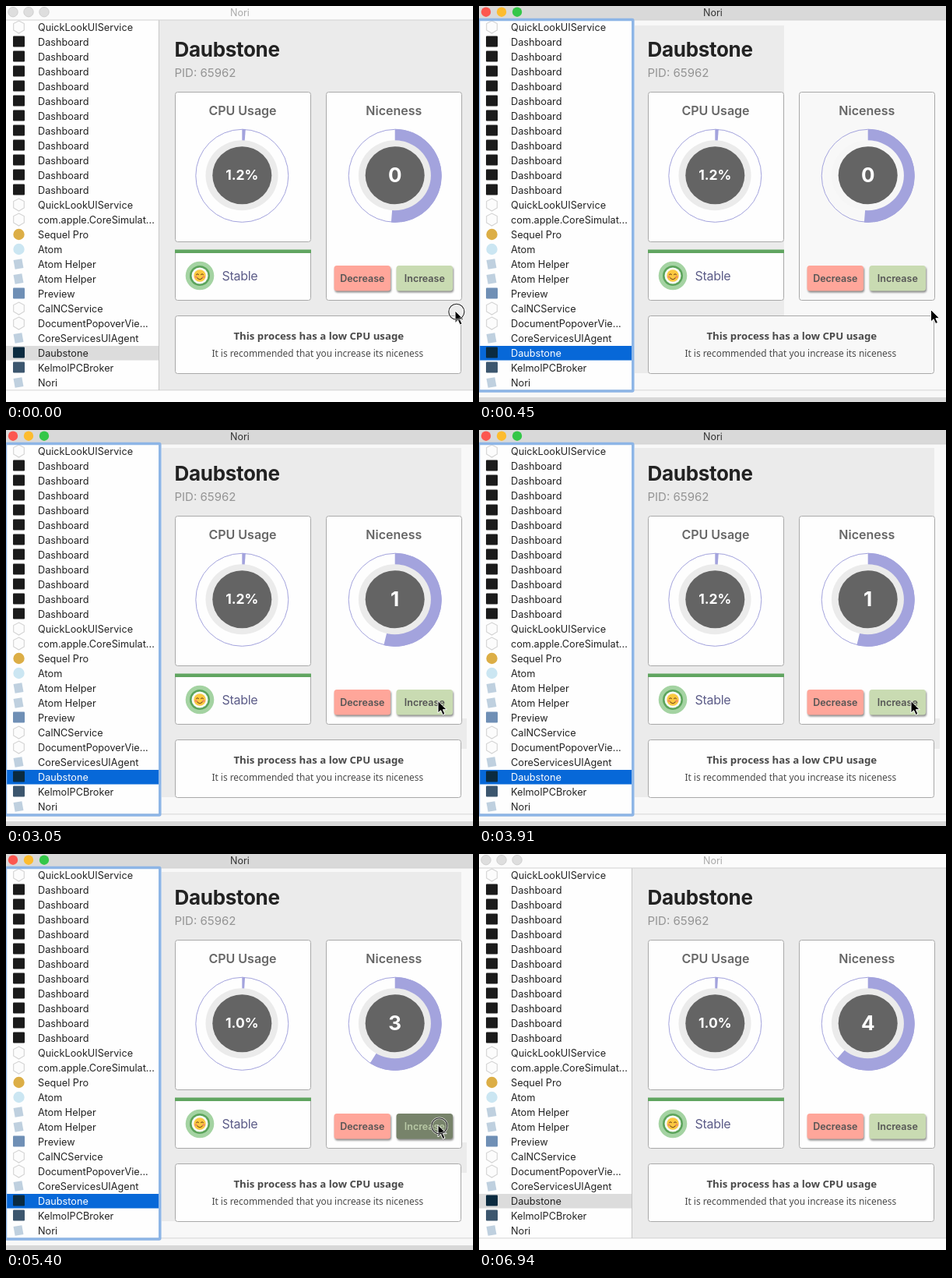
Write an HTML page that moves like this. It is 600x508 px and loops after 8000 ms.

```html
<!DOCTYPE html>
<html lang="en">
<head>
<meta charset="utf-8">
<title>Process monitor</title>
<style>
html, body { margin: 0; width: 100%; height: 100%; overflow: hidden; background: #fdfdfd; }
svg { display: block; width: 600px; height: 508px; }
text { font-family: Inter, Roboto, "Open Sans", sans-serif; }
.mid { text-anchor: middle; }
.list text { font-size: 12.7px; fill: #222; }
.card { stroke: #a9a9a9; }
.head { font-size: 16px; font-weight: 600; fill: #666; }
.num { font-weight: 700; fill: #fff; }
.btn { font-size: 12.5px; font-weight: 600; fill: #555; }
.face { filter: drop-shadow(1.5px 2px 1px rgba(0, 0, 0, .45)); }
.note { font-family: "Noto Sans", "Open Sans", sans-serif; fill: #4a4a4a; }
</style>
</head>
<body>
<svg id="stage" viewBox="0 0 600 508"></svg>
<script>
const LOOP = 8000;
const stage = document.getElementById('stage');

function set(el, attrs) {
  for (const key in attrs) el.setAttribute(key, attrs[key]);
}
function add(parent, tag, attrs, text) {
  const el = document.createElementNS('http://www.w3.org/2000/svg', tag);
  set(el, attrs);
  if (text !== undefined) el.textContent = text;
  parent.appendChild(el);
  return el;
}
const group = (attrs = {}) => add(stage, 'g', attrs);
const rect = (parent, x, y, width, height, fill, more = {}) =>
  add(parent, 'rect', { x, y, width, height, fill, ...more });
const circle = (parent, cx, cy, r, fill, more = {}) =>
  add(parent, 'circle', { cx, cy, r, fill, ...more });
const ellipse = (cx, cy, rx, ry, fill) => add(stage, 'ellipse', { cx, cy, rx, ry, fill });
const path = (parent, d, fill, more = {}) => add(parent, 'path', { d, fill, ...more });
const label = (parent, x, y, text, more = {}) => add(parent, 'text', { x, y, ...more }, text);
const show = (el, on) => el.setAttribute('visibility', on ? 'visible' : 'hidden');

// Panel background
const panel = rect(stage, 197, 18, 403, 475, '#ebebeb');
const shade = rect(stage, 200, 25, 192, 446, '#ebebeb');
const trail = rect(stage, 578, 388, 14, 21, '#ebebeb');

// Process list
rect(stage, 0, 18, 196, 475, '#fefefe');
const selection = rect(stage, 0, 436, 196, 18.5, '#dcdcdc');
const list = group({ class: 'list' });

const square = fill => (g, y) => rect(g, 9, y - 7.5, 15, 14, fill, { rx: 1 });
const disc = fill => (g, y) => circle(g, 16.5, y, 7.2, fill);
const shield = (g, y) => path(g, `M16.5 ${y - 8}l6.8 3.5v8.5l-6.8 4l-6.8-4v-8.5z`,
  '#fcfcfc', { stroke: '#d3d3d3', 'stroke-width': 1.1 });
const page = (g, y) => rect(g, 10.5, y - 6, 11, 12, '#bfd0df',
  { transform: `rotate(-10 16 ${y})` });

const rows = [
  ['QuickLookUIService', shield],
  ...Array(11).fill(['Dashboard', square('#1b1b1b')]),
  ['QuickLookUIService', shield],
  ['com.apple.CoreSimulat...', shield],
  ['Sequel Pro', disc('#dcae46')],
  ['Atom', disc('#cbe6f2')],
  ['Atom Helper', page],
  ['Atom Helper', page],
  ['Preview', square('#6f8fb5')],
  ['CalNCService', shield],
  ['DocumentPopoverVie...', shield],
  ['CoreServicesUIAgent', page],
  ['Daubstone', square('#0b2b40')],
  ['KelmoIPCBroker', square('#3c566e')],
  ['Nori', page]
];
const rowTexts = rows.map(([name, icon], i) => {
  const y = 27 + 19 * i;
  icon(list, y);
  return label(list, 41, y + 4.7, name);
});
const chosen = rowTexts.find(row => row.textContent === 'Daubstone');

const divider = rect(stage, 196, 18, 1, 475, '#c6c6c6');
rect(stage, 0, 492.5, 600, 1, '#c9c9c9');
const below = rect(stage, 0, 493.5, 600, 15, '#fdfdfd');
const backWindow = rect(stage, 0, 502, 600, 6, '#d8d8d8');

// Title bar
const bar = rect(stage, 0, 0, 600, 18, '#fbfbfb');
rect(stage, 0, 17.5, 600, 1, '#d2d2d2');
const lights = ['#fc5750', '#fdbc2f', '#34c748'].map((color, i) => ({
  color, el: circle(stage, 9 + 20 * i, 7.7, 6.2, color)
}));
const barTitle = label(stage, 300.5, 12.5, 'Nori', { class: 'mid', 'font-size': 12.5 });
const focusRing = rect(stage, -0.5, 17.5, 198.3, 476.5, 'none',
  { stroke: '#8db5e6', 'stroke-width': 3.5, rx: 1 });

// Heading
label(stage, 216.5, 65, 'Daubstone',
  { 'font-size': 26, 'font-weight': 700, fill: '#222', 'letter-spacing': -0.3 });
label(stage, 216.5, 91, 'PID: 65962', { 'font-size': 15, fill: '#949494' });

// Cards
const card = (x, y, width, height) =>
  rect(stage, x + 0.5, y + 0.5, width, height, '#fefefe', { rx: 3, class: 'card' });
card(217, 110, 174, 192);
const niceCard = card(411, 110, 174, 267);
card(217, 313, 174, 64);
const noteCard = card(217, 397, 367, 74);
rect(stage, 217, 312.5, 175, 4.5, '#60a560');

function gauge(cx, title, titleX, size) {
  const cy = 217.8;
  label(stage, titleX, 140, title, { class: 'head mid' });
  circle(stage, cx, cy, 59.5, 'none', { stroke: '#a3a3dd' });
  const wedge = path(stage, '', '#a3a3dd');
  const band = ellipse(cx - 0.3, 217.2, 46.5, 45, '#ebebeb');
  ellipse(cx, 217.2, 38, 37, '#646464');
  const text = label(stage, cx, 217 + size * 0.364, '', { class: 'num mid', 'font-size': size });
  const update = (value, fraction) => {
    const a = fraction * 2 * Math.PI;
    const x = cx + 60 * Math.sin(a), y = cy - 60 * Math.cos(a);
    text.textContent = value;
    wedge.setAttribute('d', `M${cx} ${cy}V${cy - 60}A60 60 0 ${fraction > 0.5 ? 1 : 0} 1 ${x} ${y}Z`);
  };
  return { band, update };
}
const cpuGauge = gauge(303.3, 'CPU Usage', 304, 17.5);
const niceGauge = gauge(499.7, 'Niceness', 498.3, 26);

// Status badge
circle(stage, 249, 346, 18.3, '#a4d3a2');
circle(stage, 249, 346, 13, '#5ba45b');
circle(stage, 249, 346, 10.5, '#f7faf5');
circle(stage, 249, 346, 7.7, '#fbc940');
for (const side of [-1, 1]) {
  path(stage, `M${249 + side * 3 - 1.6} 345q1.6-2.6 3.2 0`, 'none',
    { stroke: '#71431c', 'stroke-width': 1.1 });
  circle(stage, 249 + side * 5, 347.5, 1.7, '#f5945b');
}
path(stage, 'M245.5 348.5q3.5 4.5 7 0', 'none', { stroke: '#71431c', 'stroke-width': 1.2 });
label(stage, 277.5, 352, 'Stable', { 'font-size': 16, fill: '#5c5c88', 'letter-spacing': -0.3 });

// Buttons
function button(x, text, fill) {
  const face = rect(stage, x, 333, 72.5, 32.5, fill, { rx: 3.5, class: 'face' });
  return { face, text: label(stage, x + 36.3, 353.6, text, { class: 'btn mid' }) };
}
button(421.5, 'Decrease', '#ffa69a');
const increase = button(501.5, 'Increase', '#c9dbb2');

label(stage, 401.8, 428, 'This process has a low CPU usage',
  { class: 'note mid', 'font-size': 13.25, 'font-weight': 700 });
label(stage, 400.3, 450, 'It is recommended that you increase its niceness',
  { class: 'note mid', 'font-size': 11.9 });

// Pointer and click ring
const pointer = group();
path(pointer, 'M0 0V15.5L3.6 12.2L6.2 18L9 16.8L6.4 11.2H11.2Z', '#000', { stroke: '#fff' });
const ring = group();
circle(ring, 1.8, 1.3, 10, 'none', { stroke: '#fff', 'stroke-width': 2.6, opacity: 0.7 });
circle(ring, 1.8, 1.3, 10, 'none', { stroke: '#222', 'stroke-width': 1.1 });

const within = (t, spans) => spans.some(([from, to]) => t >= from && t < to);
const latest = (t, steps) => steps.reduce((v, [at, value]) => (t >= at ? value : v), steps[0][1]);

function pointerAt(t) {
  if (t < 2480) return latest(t, [[0, [577, 391]], [240, [579, 390]], [450, [580.5, 389.5]]]);
  const k = Math.min(4, Math.floor((t - 2480) / 60)) / 4;
  const ease = k * k * (3 - 2 * k);
  return [579.5 - 24.5 * ease, 389 - 41.5 * ease];
}

function draw(t) {
  const active = t >= 60 && t < 6940;
  const settled = t >= 2900;
  const stale = active && !settled;
  const cardFill = stale ? '#f8f8f8' : '#fefefe';

  panel.setAttribute('fill', active ? '#f8f8f8' : '#ebebeb');
  show(shade, active);
  set(shade, settled ? { y: 23, width: 385, height: 448 } : { y: 25, width: 192, height: 446 });
  show(trail, active && t >= 2480);
  const top = t >= 2600 ? 370 : 388;
  set(trail, { y: top, height: 409 - top });
  niceCard.setAttribute('fill', cardFill);
  noteCard.setAttribute('fill', cardFill);
  niceGauge.band.setAttribute('fill', stale ? '#f6f6f6' : '#ebebeb');

  selection.setAttribute('fill', active ? '#0768d8' : '#dcdcdc');
  chosen.style.fill = active ? '#fff' : '#222';
  show(divider, !active);
  show(focusRing, active);
  show(backWindow, active);
  below.setAttribute('fill', active ? '#f8f8f8' : '#fdfdfd');
  bar.setAttribute('fill', active ? '#d9d9d9' : '#fbfbfb');
  barTitle.setAttribute('fill', active ? '#333' : '#aaa');
  for (const { color, el } of lights)
    set(el, { fill: active ? color : '#dedede', stroke: active ? 'none' : '#cfcfcf' });

  const nice = latest(t, [[0, 0], [3050, 1], [4810, 2], [4870, 3], [5460, 4]]);
  const cpu = t < 4810 ? 1.2 : 1;
  niceGauge.update(nice, (nice + 20) / 39);
  cpuGauge.update(cpu.toFixed(1) + '%', cpu / 100);

  const pressed = within(t, [[2900, 3050], [4810, 4870], [5400, 5460]]);
  increase.face.setAttribute('fill', pressed ? '#77836a' : '#c9dbb2');
  increase.text.style.fill = pressed ? '#b9c9a6' : '#555';

  const place = `translate(${pointerAt(t).join(' ')})`;
  show(pointer, t < 5930);
  pointer.setAttribute('transform', place);
  show(ring, within(t, [[0, 180], [2900, 3050], [3410, 3470], [3790, 3910], [5400, 5460]]));
  ring.setAttribute('transform', place);
}

function frame(now) {
  draw(now % LOOP);
  requestAnimationFrame(frame);
}
draw(0);
requestAnimationFrame(frame);
</script>
</body>
</html>
```
